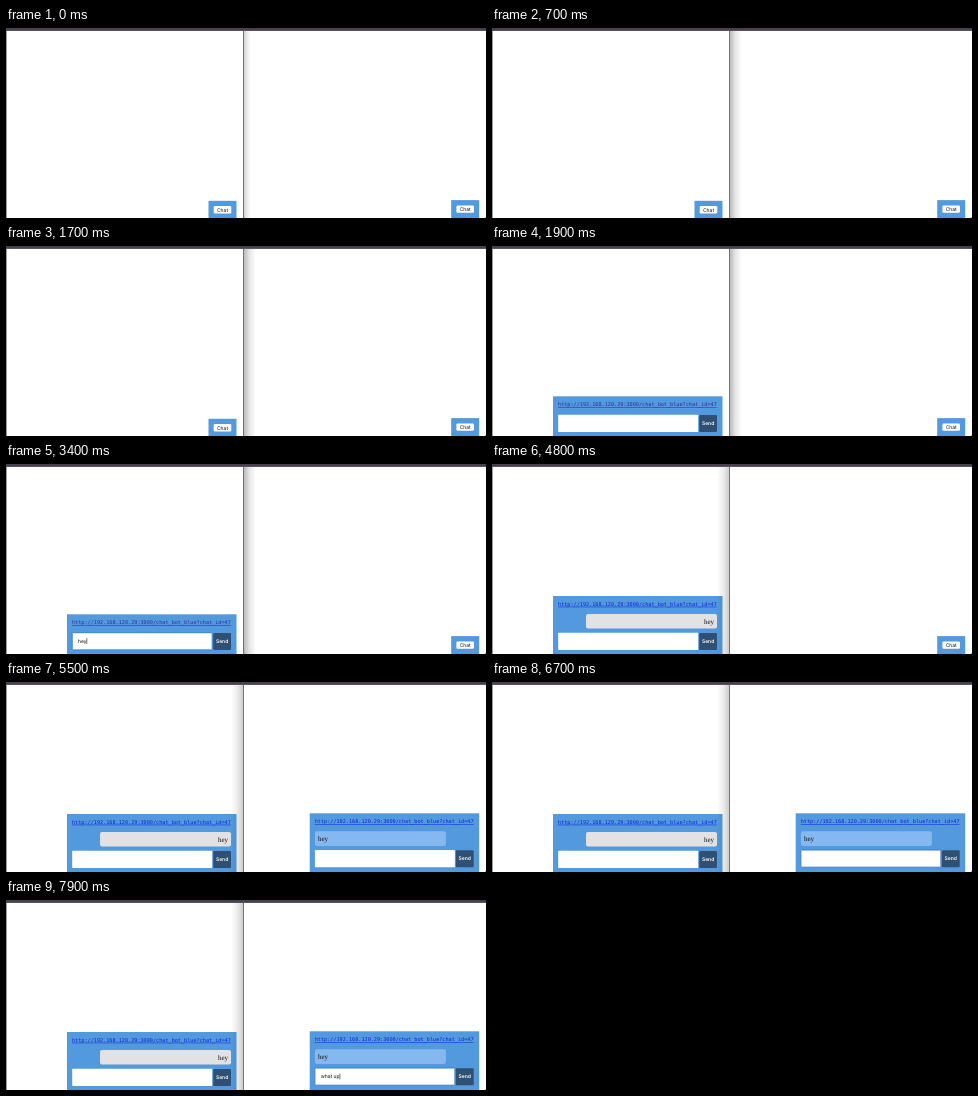
Animation of 480 by 190 pixels, one loop 8 s. Source, as an HTML page:

```html
<!DOCTYPE html>
<html lang="en">
<head>
<meta charset="utf-8">
<title>Chat between two windows</title>
<style>
html, body { margin: 0; width: 100%; height: 100%; overflow: hidden; background: #fff; }
svg { display: block; width: 480px; height: 190px; }
text { text-rendering: geometricPrecision; white-space: pre; }
.ui { font: 5px Inter, "Liberation Sans", sans-serif; fill: #111; }
.send { font-weight: 600; fill: #fff; }
.link { font: 5.18px "DejaVu Sans Mono", monospace; text-decoration: underline; }
.msg { font: 7px "Liberation Serif", serif; fill: #111; }
</style>
</head>
<body>
<svg id="stage" viewBox="0 0 480 190">
  <defs>
    <linearGradient id="fadeRight">
      <stop offset="0" stop-color="#000" stop-opacity=".27"/>
      <stop offset=".45" stop-color="#000" stop-opacity=".1"/>
      <stop offset="1" stop-color="#000" stop-opacity="0"/>
    </linearGradient>
    <linearGradient id="fadeLeft">
      <stop offset="0" stop-color="#000" stop-opacity="0"/>
      <stop offset=".55" stop-color="#000" stop-opacity=".08"/>
      <stop offset="1" stop-color="#000" stop-opacity=".2"/>
    </linearGradient>
  </defs>
</svg>
<script>
const LOOP = 8000, BLUE = '#5399de';
const URL_TEXT = 'http://192.168.120.29:3000/chat_bot_blue?chat_id=47';
const stage = document.getElementById('stage');

function add(parent, tag, attrs, text) {
  const el = document.createElementNS('http://www.w3.org/2000/svg', tag);
  for (const k in attrs) el.setAttribute(k, attrs[k]);
  if (text) el.textContent = text;
  parent.appendChild(el);
  return el;
}
const rect = (parent, x, y, width, height, fill, rx = 0) =>
  add(parent, 'rect', { x, y, width, height, fill, rx });
const show = (el, on) => { el.style.display = on ? '' : 'none'; };

// Last value whose start time has been reached
function at(steps, t) {
  let value = steps[0][1];
  for (const [start, v] of steps) if (t >= start) value = v;
  return value;
}

function makeChat({ x, y, bubbleX, bubbleFill, textX, anchor }) {
  const root = add(stage, 'g', { transform: `translate(${x} ${y})` });

  const closed = add(root, 'g', {});
  rect(closed, 141.5, 22.5, 28, 40, BLUE);
  const button = rect(closed, 146.7, 27.8, 17.6, 7.4, '#fff', 1.3);
  add(closed, 'text', { class: 'ui', x: 155.5, y: 33.4, 'text-anchor': 'middle' }, 'Chat');

  const open = add(root, 'g', {});
  const panel = rect(open, 0, 0, 169.5, 60, BLUE);
  const link = add(open, 'text', { class: 'link', x: 5 }, URL_TEXT);

  const bubble = add(open, 'g', {});
  rect(bubble, bubbleX, 0, 131, 14.6, bubbleFill, 2);
  add(bubble, 'text', { class: 'msg', x: textX, y: 9.8, 'text-anchor': anchor }, 'hey');

  const input = rect(open, 5.2, 18.4, 140, 17.2, '#fff', .6);
  rect(open, 146.2, 18.6, 17.8, 17, '#2f5072', .8);
  add(open, 'text', { class: 'ui send', x: 155.1, y: 28.8, 'text-anchor': 'middle' }, 'Send');
  const typed = add(open, 'text', { class: 'ui', x: 11, y: 28.9 });
  const caret = rect(open, 11, 23.8, .6, 6, '#222');
  return { closed, button, open, panel, link, bubble, input, typed, caret };
}

function drawChat(c, s, t) {
  const isOpen = t >= s.open, hasMsg = t >= s.message;
  show(c.closed, !isOpen);
  show(c.open, isOpen);
  c.button.setAttribute('fill', at(s.button, t));
  c.panel.setAttribute('y', hasMsg ? -18.3 : 0);
  c.panel.setAttribute('height', hasMsg ? 80 : 60);
  c.link.setAttribute('y', hasMsg ? -8.6 : 9.7);
  c.link.setAttribute('fill', hasMsg ? '#0b22d8' : '#2b2f9c');
  c.bubble.setAttribute('transform', 'translate(0 -.3)');
  show(c.bubble, hasMsg);

  const focused = t >= s.focus[0] && t < s.focus[1];
  c.input.setAttribute('stroke', focused ? '#3d7fca' : 'none');
  const value = at(s.typing, t);
  if (c.typed.textContent !== value) c.typed.textContent = value;
  show(c.caret, at(s.caret, t));
  c.caret.setAttribute('x', 11 + (value ? c.typed.getComputedTextLength() : 0));
}

// Windows
rect(stage, 0, 0, 480, 190, '#fff');
const left = makeChat({ x: 61, y: 150.3, bubbleX: 33, bubbleFill: '#e2e2e4', textX: 161, anchor: 'end' });
const right = makeChat({ x: 303.7, y: 149.6, bubbleX: 5.2, bubbleFill: '#85b8ee', textX: 8.3, anchor: 'start' });
const shadeRight = rect(stage, 238, 3, 11, 187, 'url(#fadeRight)');
const shadeLeft = rect(stage, 225, 3, 12, 187, 'url(#fadeLeft)');
rect(stage, 0, 2, .8, 188, '#858585');
rect(stage, 237, 2, 1, 188, '#747474');
rect(stage, 0, 0, 480, 2, '#454249');
rect(stage, 0, 2, 480, 1, '#5b5362');
rect(stage, 479, 189, 1, 1, '#a8a59a');

const leftSteps = {
  open: 1900, message: 3800, focus: [2500, 4800],
  button: [[0, '#fff'], [1600, '#dfe6ee'], [1700, '#fff']],
  typing: [[0, ''], [3200, 'h'], [3300, 'he'], [3400, 'hey'], [3700, '']],
  caret: [[0, false], [2500, true], [3000, false], [3200, true], [4200, false]]
};
const rightSteps = {
  open: 5500, message: 5500, focus: [6100, LOOP],
  button: [[0, '#fff'], [5200, '#dfe6ee'], [5300, '#fff']],
  typing: [[0, ''], [7100, 'w'], [7200, 'wh'], [7300, 'wha'], [7400, 'what '],
    [7600, 'what u'], [7900, 'what up']],
  caret: [[0, false], [6200, true], [6700, false], [7100, true]]
};

function draw(t) {
  drawChat(left, leftSteps, t);
  drawChat(right, rightSteps, t);
  show(shadeRight, t < 4800);
  show(shadeLeft, t >= 4800);
  shadeRight.setAttribute('width', t < 700 ? 7 : 12);
  shadeRight.setAttribute('opacity', t < 700 ? .7 : 1);
}

const began = performance.now();
function tick() {
  draw((performance.now() - began) % LOOP);
  requestAnimationFrame(tick);
}
tick();
</script>
</body>
</html>
```
